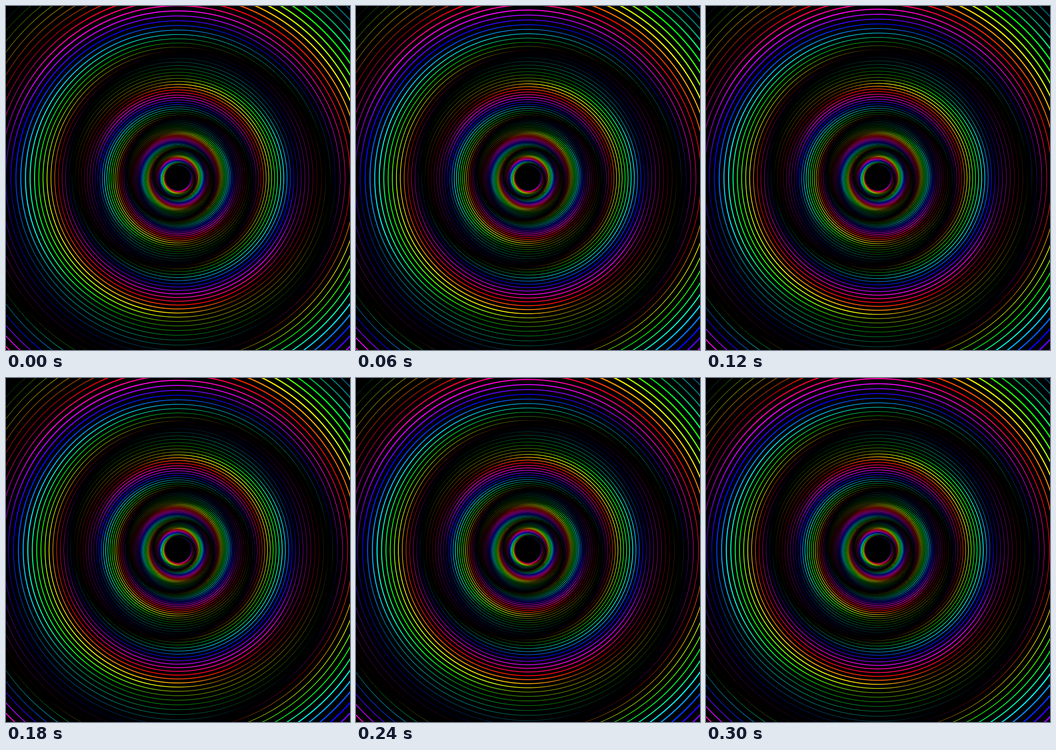
These frames come from a looping animation (748 px wide and 748 px high, 360 ms). An HTML page with a canvas:

```html
<!DOCTYPE html>
<html lang="en">
<head>
<meta charset="utf-8">
<title>Spectral rings</title>
<style>
  html, body { margin: 0; width: 100%; height: 100%; overflow: hidden; background: #000; }
  canvas { display: block; width: 748px; height: 748px; }
</style>
</head>
<body>
<canvas id="stage" width="748" height="748"></canvas>
<script>
const SIZE = 748, MID = SIZE / 2;
const LOOP_MS = 360;                // time in which each ring grows into the next one
const RATIO = 0.97, BASE = 363.3;   // ring k has radius BASE * RATIO^k
const FIRST = -16, LAST = 84;
const TURN = 24;                    // rings per turn of the dark spiral
const GAP = 274;                    // radius of the dark spiral straight above the centre
const LOG = -Math.log(RATIO);

// hue across one band, from the inner dark edge outwards
const HUES = [[0, -50], [1.3, 70], [2.3, 115], [4.3, 180], [6.5, 235], [10.4, 327],
              [14.3, 410], [18.4, 476], [22.4, 555], [24, 670]];

const clamp = (x, lo, hi) => Math.min(hi, Math.max(lo, x));

function bandHue(v) {
  let i = 1;
  while (i < HUES.length - 1 && v > HUES[i][0]) i++;
  const [x0, h0] = HUES[i - 1], [x1, h1] = HUES[i];
  return h0 + (h1 - h0) * (v - x0) / (x1 - x0);
}

// one channel of a pure hue
function channel(hue, shift) {
  const h = (((hue + shift) % 360) + 360) % 360 / 60;
  return clamp(Math.abs(h - 3) - 1, 0, 1);
}

// colour, line width and ring position at every pixel; these do not change with time
const count = SIZE * SIZE;
const radius = new Float32Array(count);
const ringPos = new Float32Array(count);
const width = new Float32Array(count);
const color = new Uint8ClampedArray(count * 3);

for (let y = 0, i = 0; y < SIZE; y++) {
  for (let x = 0; x < SIZE; x++, i++) {
    const dx = x + 0.5 - MID, dy = y + 0.5 - MID;
    const r = Math.hypot(dx, dy);
    const angle = Math.atan2(dx, -dy) / (2 * Math.PI);
    const u = Math.log(r / GAP) / (LOG * TURN) - angle;
    const band = u - Math.floor(u), v = band * TURN;
    const hue = bandHue(v) + 720 * angle;
    const light = 255 * (1 - 0.52 * clamp((v - 13.8) / 2.2, 0, 1));
    radius[i] = r;
    ringPos[i] = Math.log(BASE / r) / LOG - FIRST;
    width[i] = (0.0052 * r + 0.5) * Math.sin(Math.PI * band);
    color[i * 3] = light * channel(hue, 0);
    color[i * 3 + 1] = light * channel(hue, 240);
    color[i * 3 + 2] = light * channel(hue, 120);
  }
}

function cover(distance, w) {
  return Math.max(0, Math.min(1, w, w / 2 + 0.5 - Math.abs(distance)));
}

const ctx = document.getElementById("stage").getContext("2d");
const img = ctx.createImageData(SIZE, SIZE), out = img.data;
const rings = new Float64Array(LAST - FIRST + 2);

function draw(shift) {
  rings.fill(-9);
  for (let k = FIRST; k <= LAST; k++) rings[k - FIRST] = BASE * RATIO ** (k - shift);
  for (let i = 0; i < count; i++) {
    const r = radius[i], w = width[i];
    const k = Math.floor(ringPos[i] + shift);
    let a = 0;
    if (k >= 0 && k < rings.length - 1) {
      a = Math.min(1, cover(r - rings[k], w) + cover(r - rings[k + 1], w));
    }
    const p = i * 4, c = i * 3;
    out[p] = color[c] * a;
    out[p + 1] = color[c + 1] * a;
    out[p + 2] = color[c + 2] * a;
    out[p + 3] = 255;
  }
  ctx.putImageData(img, 0, 0);
}

let start = null;

function tick(now) {
  if (start === null) start = now;
  draw((now - start) % LOOP_MS / LOOP_MS);
  requestAnimationFrame(tick);
}
draw(0);
requestAnimationFrame(tick);
</script>
</body>
</html>
```
